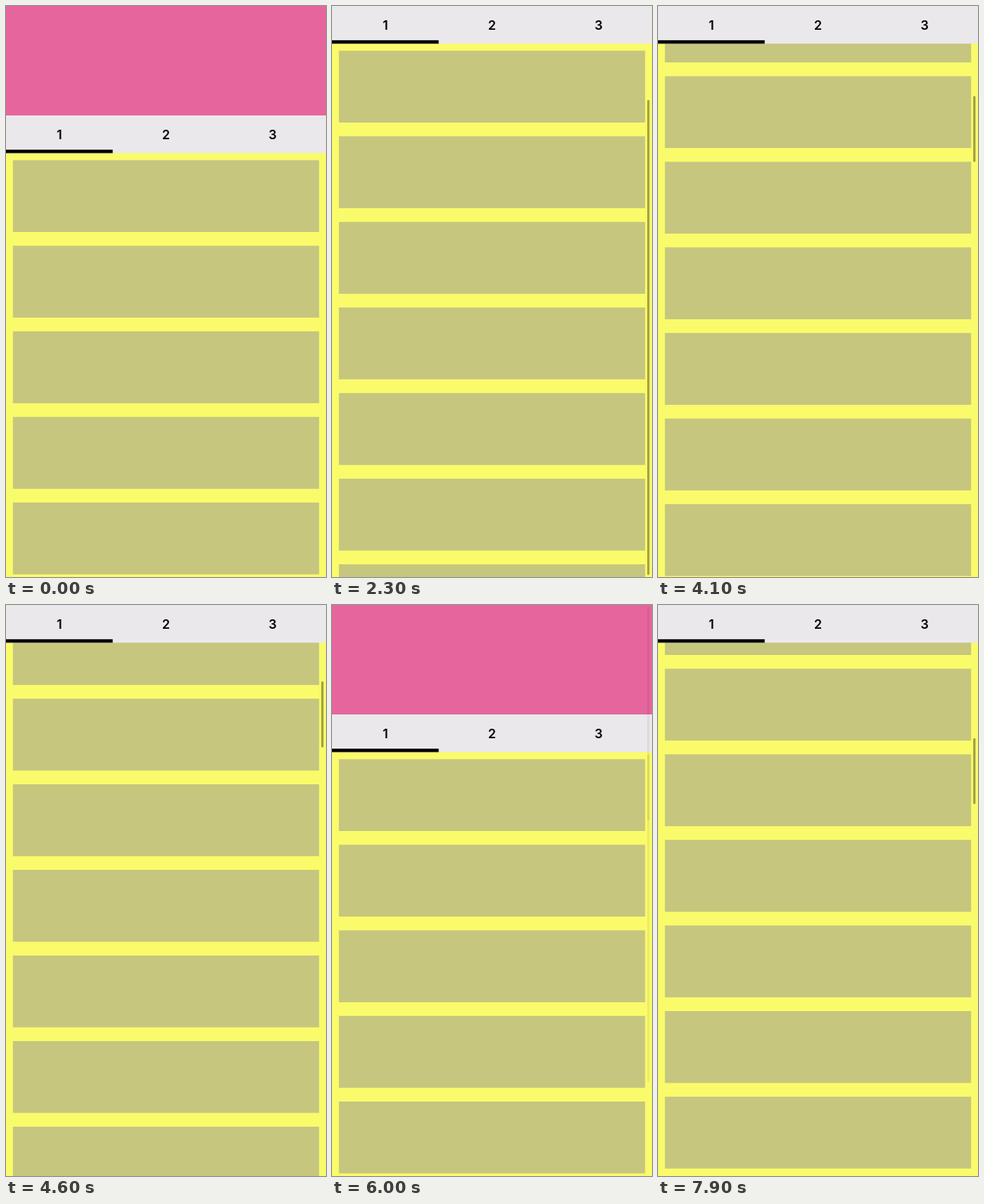
An HTML page with a canvas for the animation above (8 s loop, 404 by 720 pixels).

```html
<!DOCTYPE html>
<html lang="en">
<head>
<meta charset="utf-8">
<title>Collapsing header</title>
<style>
  html, body { margin: 0; width: 100%; height: 100%; overflow: hidden; background: #fafb6b; }
  canvas { display: block; width: 404px; height: 720px; }
</style>
</head>
<body>
<canvas id="stage"></canvas>
<script>
const W = 404, H = 720, LOOP = 8000;
const HEAD = 138, TABS = 47.5;
const PITCH = 107.93, ITEM_H = 90.6, PAD = 8.7, ITEMS = 50;

const canvas = document.getElementById('stage');
const ctx = canvas.getContext('2d');
const dpr = window.devicePixelRatio || 1;
canvas.width = W * dpr;
canvas.height = H * dpr;

const unit = (t, a, b) => Math.min(1, Math.max(0, (t - a) / (b - a)));
const smooth = u => u * u * (3 - 2 * u);
const easeOut = u => 1 - (1 - u) ** 2;
const mix = (a, b, u) => a + (b - a) * u;

// How far the header is pushed off the top
function headerScroll(t) {
  const close = smooth(unit(t, 1250, 2210));
  const open = easeOut(unit(t, 5420, 5680));
  const again = smooth(unit(t, 6330, 6790));
  return HEAD * (close - open + again);
}

// Slow drag down and back, then a quick swipe that coasts to rest
function listScroll(t) {
  if (t < 4238) return 522 * smooth(unit(t, 2860, 4238));
  if (t < 6920) return mix(522, 0, smooth(unit(t, 4238, 5255)));
  if (t < 7200) return 389 * unit(t, 6920, 7200) ** 2.7;
  return 952.7 - 563.7 * Math.exp(-(t - 7200) / 150);
}

// Scrollbar opacity: quick show, hold, then fade
const shown = (t, on, off, end) => unit(t, on, on + 60) * (1 - unit(t, off, end));

function rect(color, x, y, w, h) {
  ctx.fillStyle = color;
  ctx.fillRect(x, y, w, h);
}

function bar(y, h, alpha) {
  if (alpha <= 0) return;
  ctx.fillStyle = `rgba(0,0,0,${0.36 * alpha})`;
  ctx.beginPath();
  ctx.roundRect(398, y, 2.8, h, 1.4);
  ctx.fill();
}

function drawList(top, scroll) {
  for (let i = Math.floor(scroll / PITCH); i < ITEMS; i++) {
    const y = top + 8.9 + i * PITCH - scroll;
    if (y > H) break;
    rect('#c6c67f', PAD, y, W - 2 * PAD, ITEM_H);
  }
}

function drawTabs(y) {
  rect('#ebe8eb', 0, y, W, TABS);
  ctx.fillStyle = '#000';
  ctx.font = '600 16px Inter, Roboto, sans-serif';
  ctx.textAlign = 'center';
  for (let i = 0; i < 3; i++) ctx.fillText(i + 1, W * (i + 0.5) / 3, y + 30);
  rect('#000', 0, y + TABS - 4.3, W / 3, 4.3);
}

function draw(t) {
  const outer = headerScroll(t), inner = listScroll(t);
  const tabY = HEAD - outer, listY = tabY + TABS;
  ctx.setTransform(dpr, 0, 0, dpr, 0, 0);
  rect('#fafb6b', 0, 0, W, H);
  drawList(listY, inner);
  rect('#e5659c', 0, 0, W, tabY);
  drawTabs(tabY);

  const innerAlpha = shown(t, 2860, 5750, 6080) + shown(t, 6920, 8500, 8800);
  const outerAlpha = shown(t, 1270, 2480, 2780) + shown(t, 5420, 5750, 6050)
    + shown(t, 6340, 7040, 7300);
  bar(listY + 3 + inner * 0.1239, 83.3, innerAlpha);
  bar(2.5 + outer * 0.84, 599, outerAlpha);
}

const start = performance.now();
function tick() {
  draw((performance.now() - start) % LOOP);
  requestAnimationFrame(tick);
}
tick();
</script>
</body>
</html>
```
